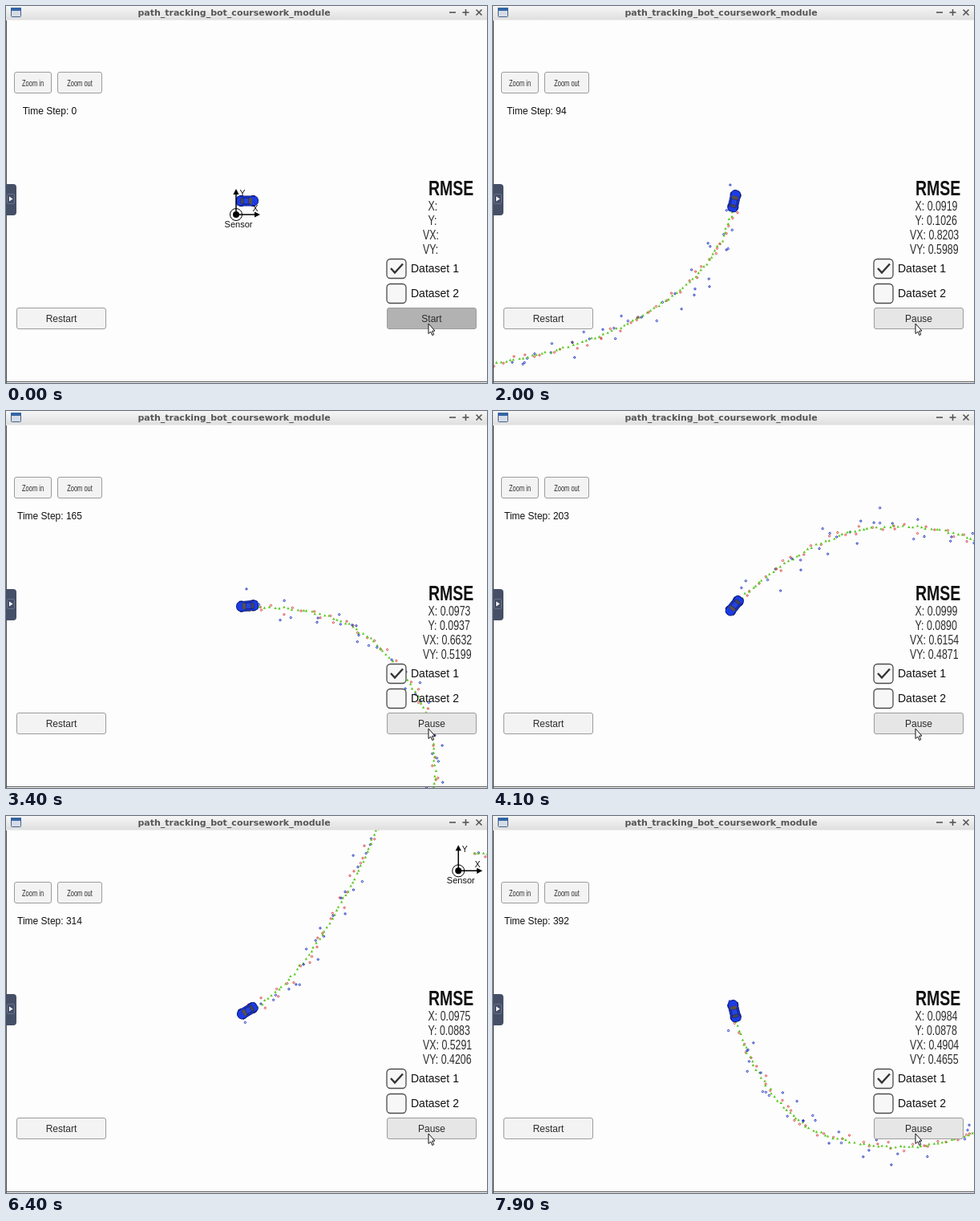
These frames come from a looping animation (600x470 px, 8000 ms). An HTML page with a canvas:

```html
<!DOCTYPE html>
<html lang="en">
<head>
<meta charset="utf-8">
<title>Tracking simulator</title>
<style>
html, body { margin: 0; width: 100%; height: 100%; overflow: hidden; background: #fdfdfd; }
canvas { display: block; width: 600px; height: 470px; }
</style>
</head>
<body>
<canvas id="stage" width="600" height="470"></canvas>
<script>
const ctx = document.getElementById('stage').getContext('2d');
const LOOP = 8000, TICK = 100, LAST = 392;
const SANS = '"Liberation Sans", Arial, sans-serif';
const NARROW = 0.75;
const VIEW = { x: 301, y: 243 };

// Time in ms, step, then RMSE of x, y, vx, vy
const KEYS = [
  [0, 0, 0.0760, 0.0920, 3.6, 0.8],
  [1300, 60, 0.0888, 0.1067, 0.9790, 0.6565],
  [2700, 127, 0.0937, 0.1003, 0.7306, 0.5663],
  [4100, 203, 0.0999, 0.0890, 0.6154, 0.4871],
  [5200, 260, 0.0993, 0.0850, 0.5628, 0.4389],
  [6400, 314, 0.0975, 0.0883, 0.5291, 0.4206],
  [7900, 392, 0.0984, 0.0878, 0.4904, 0.4655]
];

// Points of the figure eight around the sensor, one every SPAN steps;
// the first and last only shape the ends
const SPAN = 28;
const ROUTE = [
  [-145, -24], [13, -22], [174, -29], [326, -78], [436, -175], [454, -323],
  [361, -446], [209, -470], [69, -399], [-20, -268], [-76, -120], [-141, 29],
  [-237, 159], [-379, 216], [-526, 184], [-607, 50], [-593, -113]
];

// Smooth curve through the route points
function routeAt(step) {
  const s = Math.max(0, Math.min(LAST, step)) / SPAN;
  const i = Math.min(Math.floor(s), ROUTE.length - 4), u = s - i;
  const [a, b, c, d] = ROUTE.slice(i, i + 4);
  const mix = k => b[k] + u / 2 * (c[k] - a[k] +
    u * (2 * a[k] - 5 * b[k] + 4 * c[k] - d[k] + u * (3 * (b[k] - c[k]) + d[k] - a[k])));
  return { x: mix(0), y: mix(1) };
}

let seed = 4711;
function random() {
  seed = (seed * 16807) % 2147483647;
  return seed / 2147483647;
}
function noise(spread) {
  return (random() + random() + random() + random() - 2) * spread * 1.73;
}

// One estimate and one lidar or radar reading per step
const marks = [];
for (let s = 1; s <= LAST; s++) {
  const p = routeAt(s), lidar = s % 2 === 1;
  const est = { x: p.x + noise(0.8), y: p.y + noise(0.8) };
  const r = Math.hypot(p.x, p.y) + noise(6.5);
  const a = Math.atan2(p.y, p.x) + noise(0.03);
  const hit = lidar
    ? { x: p.x + noise(3.2), y: p.y + noise(3.2) }
    : { x: r * Math.cos(a), y: r * Math.sin(a) };
  marks.push({ est, hit, color: lidar ? '#dc3c3c' : '#1428bc' });
}

function stateAt(t) {
  const i = Math.max(1, KEYS.findIndex(key => key[0] >= t));
  const a = KEYS[i - 1], b = KEYS[i];
  const step = Math.round(a[1] + (b[1] - a[1]) * (t - a[0]) / (b[0] - a[0]));
  // Running errors settle with the root of the sample count
  const f = s => 1 / Math.sqrt(s + 3);
  const u = (f(step) - f(a[1])) / (f(b[1]) - f(a[1]));
  const errors = a.slice(2).map((v, k) => v + (b[k + 2] - v) * u);
  return { step, errors };
}

function paint(fill, stroke, line = 1) {
  if (fill) { ctx.fillStyle = fill; ctx.fill(); }
  if (stroke) { ctx.strokeStyle = stroke; ctx.lineWidth = line; ctx.stroke(); }
}

function box(x, y, w, h, r, ...style) {
  ctx.beginPath();
  ctx.roundRect(x, y, w, h, r);
  paint(...style);
}

function poly(points, ...style) {
  ctx.beginPath();
  points.forEach(([x, y]) => ctx.lineTo(x, y));
  ctx.closePath();
  paint(...style);
}

function disc(x, y, r, ...style) {
  ctx.beginPath();
  ctx.arc(x, y, r, 0, Math.PI * 2);
  paint(...style);
}

function line(points, color, width) {
  ctx.beginPath();
  points.forEach(([x, y]) => ctx.lineTo(x, y));
  paint(null, color, width);
}

function text(str, x, y, size, { align = 'center', color = '#111', bold = false, narrow = false, family = SANS } = {}) {
  ctx.save();
  ctx.translate(x, y);
  if (narrow) ctx.scale(NARROW, 1);
  ctx.font = `${bold ? 'bold ' : ''}${size}px ${family}`;
  ctx.textAlign = align;
  ctx.fillStyle = color;
  ctx.fillText(str, 0, 0);
  ctx.restore();
}

function drawTrail(step) {
  for (const { est, hit, color } of marks.slice(0, step)) {
    disc(hit.x, hit.y, 1.15, null, color, 0.95);
    poly([[est.x, est.y - 1.8], [est.x + 1.7, est.y + 1.3], [est.x - 1.7, est.y + 1.3]], '#58c81e');
  }
}

function drawSensor() {
  line([[0, -26], [0, 0], [25, 0]], '#000', 1.5);
  poly([[0, -32], [3.6, -25], [-3.6, -25]], '#000');
  poly([[30, 0], [23, -3.6], [23, 3.6]], '#000');
  disc(0, 0, 7.5, null, '#000');
  disc(0, 0, 4, '#000');
  text('Y', 8, -23, 10.5);
  text('X', 24, -4, 10.5);
  text('Sensor', 3, 16, 11);
}

function drawCar(angle) {
  ctx.save();
  ctx.translate(VIEW.x, VIEW.y);
  ctx.rotate(angle);
  for (const x of [-10, 5]) box(x, -7, 5, 14, 1, '#0c1650');
  box(-13.5, -6, 27, 12, [4, 5.5, 5.5, 4], '#1c3ce4', '#0c1c84');
  box(-8.5, -4.5, 14.5, 9, 2.5, '#14248c');
  box(2, -4, 4, 8, 1.5, '#5a5046');
  box(-8, -3.5, 3, 7, 1, '#4a4648');
  box(-4.5, -3.3, 6, 6.6, 1, '#2444dc');
  ctx.restore();
}

function drawWindow() {
  const bar = ctx.createLinearGradient(0, 0, 0, 18);
  bar.addColorStop(0, '#f6f6f6');
  bar.addColorStop(1, '#dedede');
  ctx.fillStyle = bar;
  ctx.fillRect(0, 0, 600, 17.5);
  box(6.5, 2.5, 12, 11, 1, '#d5dce6', '#46618d');
  ctx.fillStyle = '#3465a4';
  ctx.fillRect(6, 2, 13, 4);
  text('path_tracking_bot_coursework_module', 284.5, 12, 11,
    { bold: true, color: '#555', family: '"DejaVu Sans", sans-serif' });
  line([[553, 8], [561, 8]], '#555', 1.6);
  line([[569.5, 8], [577.5, 8]], '#555', 1.6);
  line([[573.5, 4], [573.5, 12]], '#555', 1.6);
  line([[586.5, 4.5], [593.5, 11.5]], '#555', 1.6);
  line([[593.5, 4.5], [586.5, 11.5]], '#555', 1.6);
  line([[0.5, 18], [0.5, 470]], '#555', 1);
  line([[0, 468.5], [600, 468.5]], '#555', 1);
  box(-4, 222, 17, 39, 4, '#454f66');
  box(1.5, 234.5, 9, 12, 1.5, null, '#66728a');
  poly([[4, 237.5], [8.5, 240.5], [4, 243.5]], '#fff');
}

function button(label, x, y, w, fill, size, narrow) {
  box(x + 0.5, y + 0.5, w, 26, 2.5, fill, '#9c9c9c');
  text(label, x + w / 2 + 0.5, y + 18, size, { narrow, color: '#2c2c2c' });
}

function drawControls(step, errors) {
  const running = step > 0;
  button('Zoom in', 10, 82, 46, '#f3f3f3', 10, true);
  button('Zoom out', 64, 82, 55, '#f3f3f3', 10, true);
  text('Time Step: ' + step, 54.5, 135, 12);

  text('RMSE', 527, 235.5, 26, { align: 'left', bold: true, narrow: true });
  ['X', 'Y', 'VX', 'VY'].forEach((name, i) => {
    const value = running ? ' ' + errors[i].toFixed(4) : '';
    text(name + ':' + value, i < 2 ? 526.5 : 520, 255 + i * 18, 16.5,
      { align: 'left', narrow: true, color: '#2c2c2c' });
  });

  for (const i of [0, 1]) {
    box(475, 315.5 + i * 31, 24, 24, 4.5, '#f7f7f7', '#4c4c4c', 1.3);
    text('Dataset ' + (i + 1), 505, 332 + i * 31, 14, { align: 'left' });
  }
  line([[480, 327], [485, 332.5], [495, 321.5]], '#333', 2.4);

  button('Restart', 13, 376, 111, '#f3f3f3', 12);
  button(running ? 'Pause' : 'Start', 475, 376, 111, running ? '#e6e6e6' : '#b2b2b2', 12);

  poly([[527, 396], [527, 408.5], [529.8, 406], [531.8, 410.5], [533.7, 409.6], [531.7, 405.2], [535, 405]],
    '#fff', '#111');
}

function render(t) {
  const { step, errors } = stateAt(t);
  const p = routeAt(step), a = routeAt(step - 1), b = routeAt(step + 1);
  // The first estimates sit above the car, later ones just below it
  const carY = p.y - 3 + 8 * Math.exp(-step / 3);

  ctx.fillStyle = '#fdfdfd';
  ctx.fillRect(0, 0, 600, 470);
  ctx.save();
  ctx.translate(VIEW.x - p.x, VIEW.y - carY);
  drawTrail(step);
  ctx.restore();
  drawCar(Math.atan2(b.y - a.y, b.x - a.x));
  ctx.save();
  ctx.translate(VIEW.x - p.x - 1, VIEW.y - carY);
  drawSensor();
  ctx.restore();
  drawControls(step, errors);
  drawWindow();
}

const began = performance.now();
function loop() {
  const t = (performance.now() - began) % LOOP;
  render(Math.floor(t / TICK) * TICK);
  requestAnimationFrame(loop);
}
loop();
</script>
</body>
</html>
```
